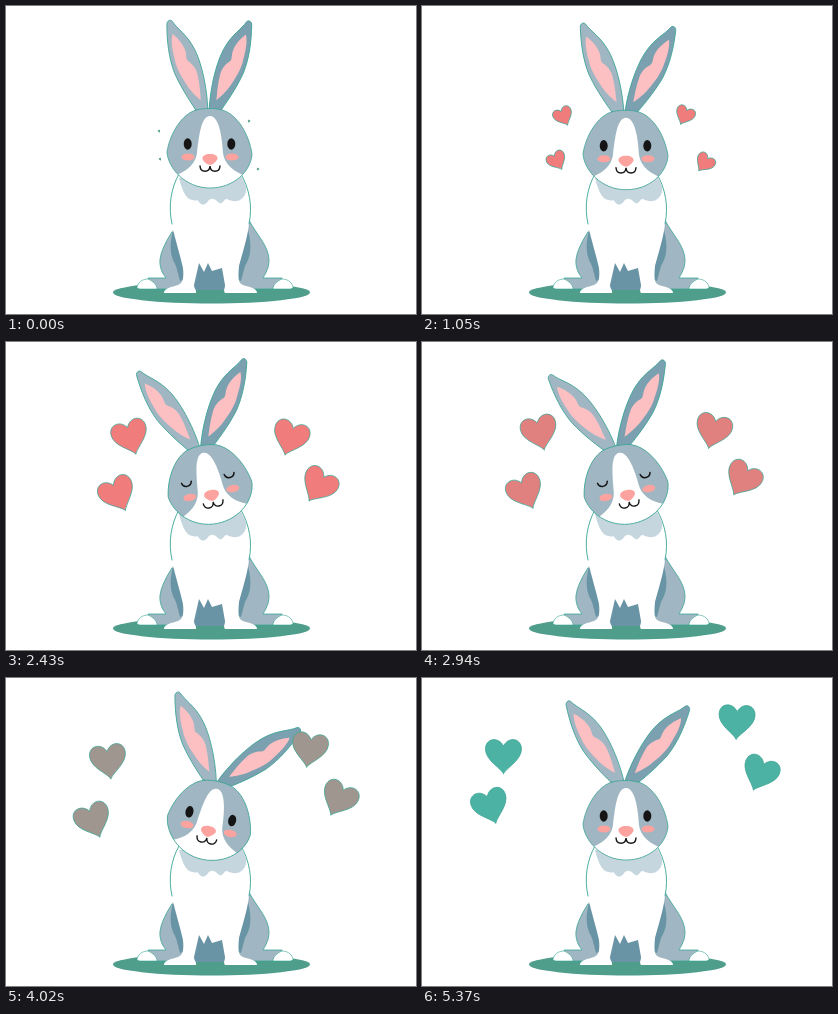
Write an HTML page with a canvas that moves like this. It is 410 px wide and 308 px high and loops after 5.4 s.

```html
<!DOCTYPE html>
<html lang="en">
<head>
<meta charset="utf-8">
<title>Rabbit with hearts</title>
<style>
html, body { margin: 0; width: 100%; height: 100%; overflow: hidden; background: #fff; }
canvas { display: block; width: 410px; height: 308px; }
</style>
</head>
<body>
<canvas id="stage"></canvas>
<script>
const W = 410, H = 308, LOOP = 5400, STEP = 30;
const canvas = document.getElementById('stage');
const ctx = canvas.getContext('2d');
const ratio = window.devicePixelRatio || 1;
canvas.width = W * ratio;
canvas.height = H * ratio;

const FUR = '#a0b7c3', SHADE = '#7ba1b1', DARK = '#6894a6', BIB = '#c5d6df';
const PINK = '#fcc0c2', BLUSH = '#fda39f', EDGE = '#3ba595', INK = '#151515';
const RED = [240, 124, 124], TEAL = [74, 179, 163];

const path = d => new Path2D(d);
const EAR = path('M-6 3C-9-10-13-26-14-44C-14-60-10-76-4-92C-3-95 1-96 2-93C4-84 11-76 13-60C15-46 12-20 4 3Z');
const EAR_IN = path('M-2-81C1-76 4-69 4-62C4-56 1-53 3-50C6-46 8-40 7-34C6-25 3-16 1-9C-3-16-6-24-7-30C-10-42-10-52-9-56C-8-66-6-76-2-81Z');
const HEAD = path('M190 104C176 108 164 127 161 146C162 162 179 182 204 182C228 182 245 165 246 148C243 128 231 108 216 104C208 102 198 102 190 104Z');
const FACE = path('M162 172C176 168 189 161 191 147C193 130 195 110 204 110C213 110 216 130 217 147C219 161 232 168 246 172L240 190L168 190Z');
const NOSE = path('M204 148C209 148 212 150 211.5 153C210 156 206 159 204 159C202 159 197.5 156 196.5 153C196 150 199 148 204 148Z');
const MOUTH = path('M194 160C194.5 167 203.5 167 204 160C204.5 167 213.5 167 214 160');
const NECK = path('M173 168C165 182 162 200 166 218M243 218C247 200 243 182 235 168');
const BODY = path('M173 168C165 182 162 200 166 218C169 234 174 248 177 262C178 272 177 277 172 279C166 281 158 282 158 287L190 287C191 284 188 283 188 279L193 257L198 266L202 257L206 265L216 262L219 279C219 283 217 284 219 287L251 287C251 282 243 281 237 279C232 277 232 272 233 260C236 248 241 234 243 218C247 200 243 182 235 168Z');
const CHEST = path('M173 172C176 184 180 194 187 194C190 196 191 192 193 196C196 200 200 199 202 195C206 191 209 193 213 197C217 199 218 192 221 193C228 197 237 196 240 186C241 180 238 175 235 170Z');
const HAUNCH_L = path('M166 226C158 238 153 250 154 258C155 266 158 269 160 272L142 272L148 283L182 283L178 240Z');
const HAUNCH_R = path('M243 214C250 228 263 240 263 254C263 263 259 268 257 272L276 272L270 283L228 283L232 240Z');
const FOOT_L = path('M131 282C131 277 136 273 142 273C147 275 151 279 151 283L134 283Z');
const FOOT_R = path('M287 282C287 277 282 273 276 273C271 275 267 279 267 283L284 283Z');
const SHADOW = path('M167 224C163 240 164 250 170 260L174 275L179 273L176 250ZM242 224C246 240 245 250 239 260L235 275L230 273L233 250Z');
const GAP = path('M186 252L222 252L222 284L186 284Z');
const HEART = path('M0 17.5C-4 11-18 4-18-7C-18-18-5-20 0-10C5-20 18-18 18-7C18 4 4 11 0 17.5Z');

// Each heart drifts along a quadratic curve while its angle settles.
const HEARTS = [
  { from: [153, 125], via: [125, 84], to: [81, 78], turn: [-32, 0] },
  { from: [154, 153], via: [104, 162], to: [68, 128], turn: [-32, -18] },
  { from: [243, 115], via: [297, 106], to: [315, 43], turn: [30, 2] },
  { from: [252, 163], via: [339, 152], to: [338, 95], turn: [40, 22] }
];

const clamp = v => Math.max(0, Math.min(1, v));
const mix = (a, b, p) => a + (b - a) * p;
const curve = (a, b, c, p) => mix(mix(a, b, p), mix(b, c, p), p);
const ramp = (t, from, to) => {
  const p = clamp((t - from) / (to - from));
  return p * p * (3 - 2 * p);
};

function fill(shape, color, edge) {
  ctx.fillStyle = color;
  ctx.fill(shape);
  if (edge) stroke(shape, EDGE, edge);
}

function stroke(shape, color, width) {
  ctx.strokeStyle = color;
  ctx.lineWidth = width;
  ctx.lineCap = 'round';
  ctx.stroke(shape);
}

function oval(x, y, rx, ry, color) {
  ctx.beginPath();
  ctx.ellipse(x, y, rx, ry, 0, 0, Math.PI * 2);
  ctx.fillStyle = color;
  ctx.fill();
}

function placed(x, y, deg, sx, sy, draw) {
  ctx.save();
  ctx.translate(x, y);
  ctx.rotate(deg * Math.PI / 180);
  ctx.scale(sx, sy);
  draw();
  ctx.restore();
}

function drawHeart({ from, via, to, turn }, t) {
  const p = t / LOOP;
  const [x, y] = from.map((a, i) => curve(a, via[i], to[i], p));
  const size = Math.min(1, 0.05 + t / 2150);
  const fade = clamp(p * 2 - 1);
  const color = RED.map((c, i) => Math.round(mix(c, TEAL[i], fade)));
  placed(x, y, mix(...turn, p), size, size, () => {
    fill(HEART, `rgb(${color})`, 0.7 / size);
  });
}

function drawEar(x, deg, side, color) {
  placed(x, 103, deg, side, 1, () => {
    fill(EAR, color, 0.8);
    fill(EAR_IN, PINK);
  });
}

function drawEye(x, shut) {
  if (shut) stroke(path(`M${x - 5} 135.5c1 5.5 9 5.5 10 0`), INK, 1.5);
  else oval(x, 138, 4, 5.8, INK);
}

function drawHead(t) {
  const tilt = 11.6 * (2 * ramp(t, 3520, 3990) - ramp(t, 1860, 2330) - ramp(t, 4500, 5000));
  const bob = t > 600 && t < 1860 ? 4 * Math.sin((t - 600) / 420 * Math.PI * 2) : 0;
  const left = 20.6 + 4.4 * ramp(t, 0, 2430) + 7.5 * ramp(t, 2430, 3510);
  const right = 21.7 + 14 * ramp(t, 0, 2430) + 7.5 * ramp(t, 2430, 4020) - 5.5 * ramp(t, 4020, 5370);
  const shut = t >= 2250 && t < 3000;

  placed(204 - tilt * 0.13, 152 + bob, tilt, 1, 1, () => {
    ctx.translate(-204, -152);
    drawEar(208, right, -1, SHADE);
    drawEar(197, -left, 1, FUR);
    fill(HEAD, FUR);
    ctx.save();
    ctx.clip(HEAD);
    fill(FACE, '#fff');
    ctx.restore();
    stroke(HEAD, EDGE, 0.8);
    for (const side of [-1, 1]) {
      oval(204 + side * 22, 151, 6.5, 3.6, BLUSH);
      drawEye(203.5 + side * 21.8, shut);
    }
    fill(NOSE, BLUSH);
    stroke(MOUTH, INK, 1.4);
  });
}

function drawBody() {
  oval(205.5, 286.5, 98.5, 11, '#4f9d8b');
  for (const haunch of [HAUNCH_L, HAUNCH_R]) fill(haunch, FUR, 0.8);
  fill(SHADOW, DARK);
  fill(GAP, DARK);
  for (const foot of [FOOT_L, FOOT_R]) fill(foot, '#fff', 0.6);
  fill(BODY, '#fff');
  stroke(NECK, EDGE, 0.9);
  fill(CHEST, BIB);
}

function draw(t) {
  ctx.setTransform(ratio, 0, 0, ratio, 0, 0);
  ctx.fillStyle = '#fff';
  ctx.fillRect(0, 0, W, H);
  drawBody();
  drawHead(t);
  for (const heart of HEARTS) drawHeart(heart, t);
}

const start = performance.now();
function tick() {
  const time = (performance.now() - start) % LOOP;
  draw(Math.floor(time / STEP) * STEP);
  requestAnimationFrame(tick);
}
tick();
</script>
</body>
</html>
```
